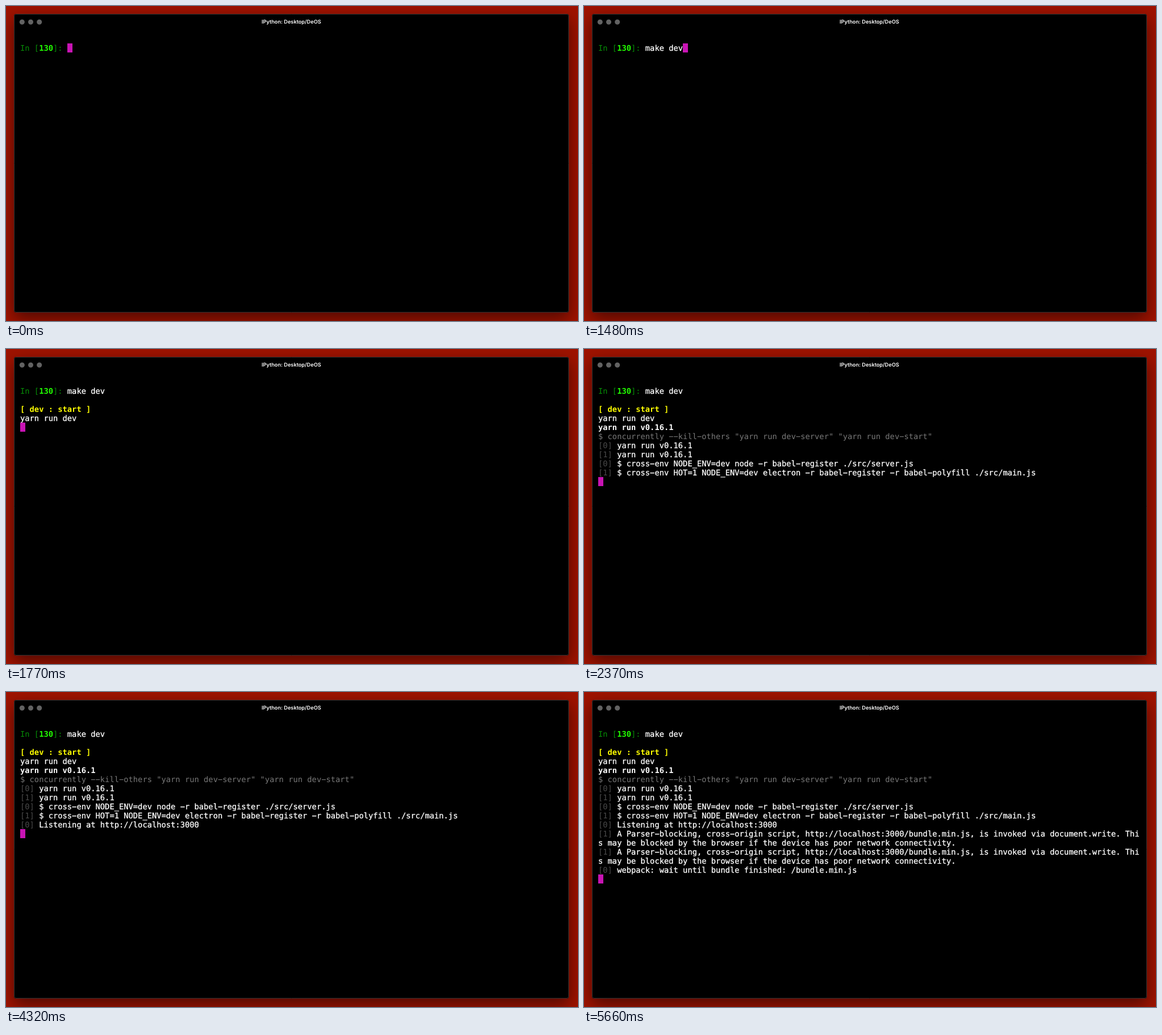
These frames come from a looping animation (1007x556 px, 8000 ms). An HTML page with a canvas:

```html
<!DOCTYPE html>
<html lang="en">
<head>
<meta charset="utf-8">
<title>Terminal</title>
<style>
  html, body { margin: 0; width: 100%; height: 100%; overflow: hidden; background: #9f1300; }
  canvas { display: block; }
</style>
</head>
<body>
<canvas id="stage" width="1007" height="556"></canvas>
<script>
const ctx = document.getElementById('stage').getContext('2d');
const LOOP = 8000;
const LEFT = 25, TOP = 66, CELL = 8.284, ROW = 16, BASELINE = 12.7;
const MONO = '"DejaVu Sans Mono", monospace';

const STYLES = {
  white:  { color: '#ffffff', weight: 400, thicken: 0.3 },
  bold:   { color: '#ffffff', weight: 700 },
  yellow: { color: '#ffff00', weight: 700 },
  green:  { color: '#068c06', weight: 400 },
  lime:   { color: '#22ff00', weight: 700 },
  grey:   { color: '#787878', weight: 400 },
  dim:    { color: '#4a4a4a', weight: 400 }
};

const tagged = (tag, text) => [['dim', `[${tag}] `], ['white', text]];
const warning = [
  tagged(1, 'A Parser-blocking, cross-origin script, http://localhost:3000/bundle.min.js, is invoked via document.write. Thi'),
  [['white', 's may be blocked by the browser if the device has poor network connectivity.']]
];

const prompt = [['green', 'In ['], ['lime', '130'], ['green', ']: ']];
const promptLength = 10;
const command = 'make dev';

const output = [
  [],
  [['yellow', '[ dev : start ]']],
  [['white', 'yarn run dev']],
  [['bold', 'yarn run v0.16.1']],
  [['grey', '$ concurrently --kill-others "yarn run dev-server" "yarn run dev-start"']],
  tagged(0, 'yarn run v0.16.1'),
  tagged(1, 'yarn run v0.16.1'),
  tagged(0, '$ cross-env NODE_ENV=dev node -r babel-register ./src/server.js'),
  tagged(1, '$ cross-env HOT=1 NODE_ENV=dev electron -r babel-register -r babel-polyfill ./src/main.js'),
  tagged(0, 'Listening at http://localhost:3000'),
  ...warning,
  ...warning,
  tagged(0, 'webpack: wait until bundle finished: /bundle.min.js')
];

// Each step: start time, characters typed, output rows shown, cursor row
const steps = [
  [0, 0, 0, 0],
  [440, 1, 0, 0],
  [590, 2, 0, 0],
  [730, 4, 0, 0],
  [880, 5, 0, 0],
  [1180, 6, 0, 0],
  [1330, 7, 0, 0],
  [1480, 8, 0, 0],
  [1620, 8, 2, 1],
  [1770, 8, 3, 4],
  [1920, 8, 5, 6],
  [2370, 8, 9, 10],
  [4320, 8, 10, 11],
  [5370, 8, 14, 15],
  [5660, 8, 15, 16]
];

function drawWindow() {
  ctx.fillStyle = '#9f1300';
  ctx.fillRect(0, 0, 1007, 556);

  ctx.save();
  ctx.shadowColor = 'rgba(0, 0, 0, 0.5)';
  ctx.shadowBlur = 28;
  ctx.shadowOffsetY = 10;
  ctx.fillStyle = '#000';
  ctx.beginPath();
  ctx.roundRect(14, 14, 977, 527, 4);
  ctx.fill();
  ctx.restore();

  ctx.strokeStyle = '#333333';
  ctx.lineWidth = 1;
  ctx.beginPath();
  ctx.roundRect(14.5, 14.5, 976, 526, 3.5);
  ctx.stroke();

  ctx.fillStyle = '#626262';
  for (const x of [28.3, 43.5, 58.7]) {
    ctx.beginPath();
    ctx.arc(x, 28.3, 4.5, 0, Math.PI * 2);
    ctx.fill();
  }

  ctx.fillStyle = '#fff';
  ctx.font = '600 9.2px Inter, sans-serif';
  ctx.textAlign = 'center';
  ctx.fillText('IPython: Desktop/DeOS', 502.3, 30.6);
  ctx.textAlign = 'left';
}

function drawLine(spans, row) {
  const y = TOP + row * ROW + BASELINE;
  let col = 0;
  for (const [name, text] of spans) {
    const { color, weight, thicken } = STYLES[name];
    ctx.font = `${weight} 13.76px ${MONO}`;
    ctx.fillStyle = ctx.strokeStyle = color;
    ctx.lineWidth = thicken || 1;
    // The terminal face has wide hyphens
    for (const char of text.replaceAll('-', '\u2212')) {
      const x = LEFT + col++ * CELL;
      ctx.fillText(char, x, y);
      if (thicken) ctx.strokeText(char, x, y);
    }
  }
}

function drawCursor(col, row) {
  ctx.fillStyle = '#c814b4';
  ctx.fillRect(Math.round(LEFT + col * CELL), TOP + row * ROW, 9, ROW);
}

function frame(now) {
  const time = now % LOOP;
  const [, typed, rows, cursorRow] = steps.findLast(([start]) => start <= time);
  ctx.textRendering = 'geometricPrecision';
  ctx.lineJoin = 'round';

  drawWindow();
  drawLine([...prompt, ['white', command.slice(0, typed)]], 0);
  output.slice(0, rows).forEach((line, i) => drawLine(line, i + 1));
  drawCursor(cursorRow ? 0 : promptLength + typed, cursorRow);
  requestAnimationFrame(frame);
}

frame(0);
</script>
</body>
</html>
```
